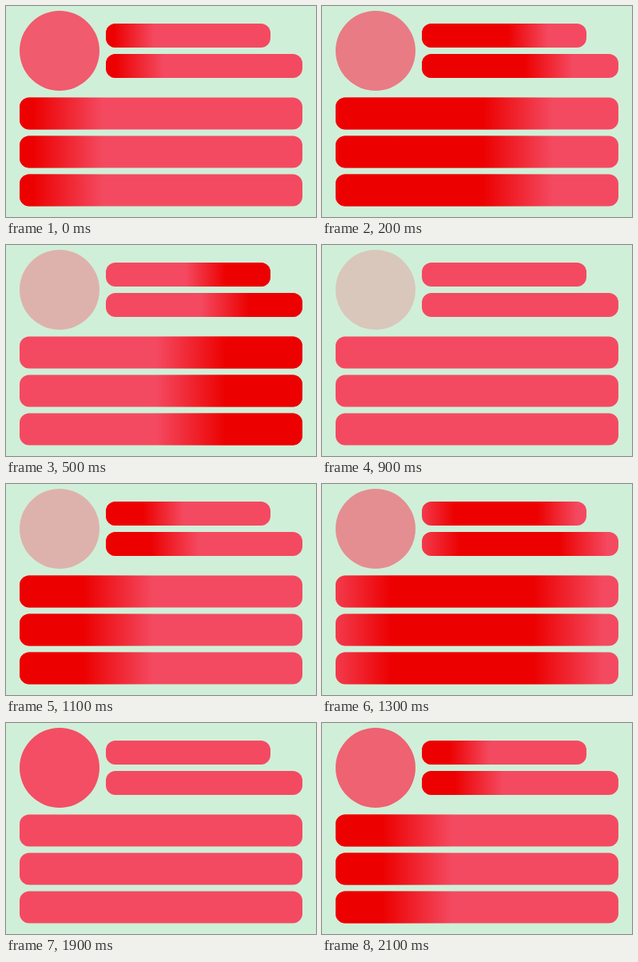
Write an HTML page with a canvas that moves like this. It is 388 px wide and 264 px high and loops after 2200 ms.

```html
<!DOCTYPE html>
<html lang="en">
<head>
<meta charset="utf-8">
<title>Skeleton loader</title>
<style>
html, body { margin: 0; width: 100%; height: 100%; overflow: hidden; background: #d0efd8; }
canvas { display: block; }
</style>
</head>
<body>
<canvas id="stage" width="388" height="264"></canvas>
<script>
const ctx = document.getElementById('stage').getContext('2d');
const LOOP = 2200, STEP = 100, WAVE = 1025, FADE = 2050;
const BASE = '#f44a61', GLOW = '#ec0000', CLEAR = 'rgba(236,0,0,0)';

// x, y, width, height
const bars = [
  [125, 22, 206, 30],
  [125, 60, 246, 30],
  [17, 114.5, 354, 40],
  [17, 162.5, 354, 40],
  [17, 210.5, 354, 40]
];

function drawBar([x, y, w, h], shift) {
  const left = x + shift * w;
  const wave = ctx.createLinearGradient(left, 0, left + w, 0);
  [[0, CLEAR], [0.25, GLOW], [0.75, GLOW], [1, CLEAR]]
    .forEach(([at, color]) => wave.addColorStop(at, color));
  ctx.beginPath();
  ctx.roundRect(x, y, w, h, 12);
  ctx.fillStyle = BASE;
  ctx.fill();
  ctx.fillStyle = wave;
  ctx.fill();
}

function drawCircle(alpha) {
  ctx.globalAlpha = alpha;
  ctx.fillStyle = BASE;
  ctx.beginPath();
  ctx.arc(67, 56, 50, 0, Math.PI * 2);
  ctx.fill();
  ctx.globalAlpha = 1;
}

function draw(now) {
  const t = Math.floor((now % LOOP) / STEP) * STEP;
  // The wave crosses each bar at constant speed, then rests out of sight.
  const shift = Math.min(1, -1 + ((t + 125) % WAVE) * 0.00237);
  const alpha = 0.6 - 0.38 * Math.cos(2 * Math.PI * (t - 800) / FADE);
  ctx.fillStyle = '#d0efd8';
  ctx.fillRect(0, 0, 388, 264);
  drawCircle(alpha);
  bars.forEach(bar => drawBar(bar, shift));
}

function tick() {
  draw(performance.now());
  requestAnimationFrame(tick);
}
tick();
</script>
</body>
</html>
```
